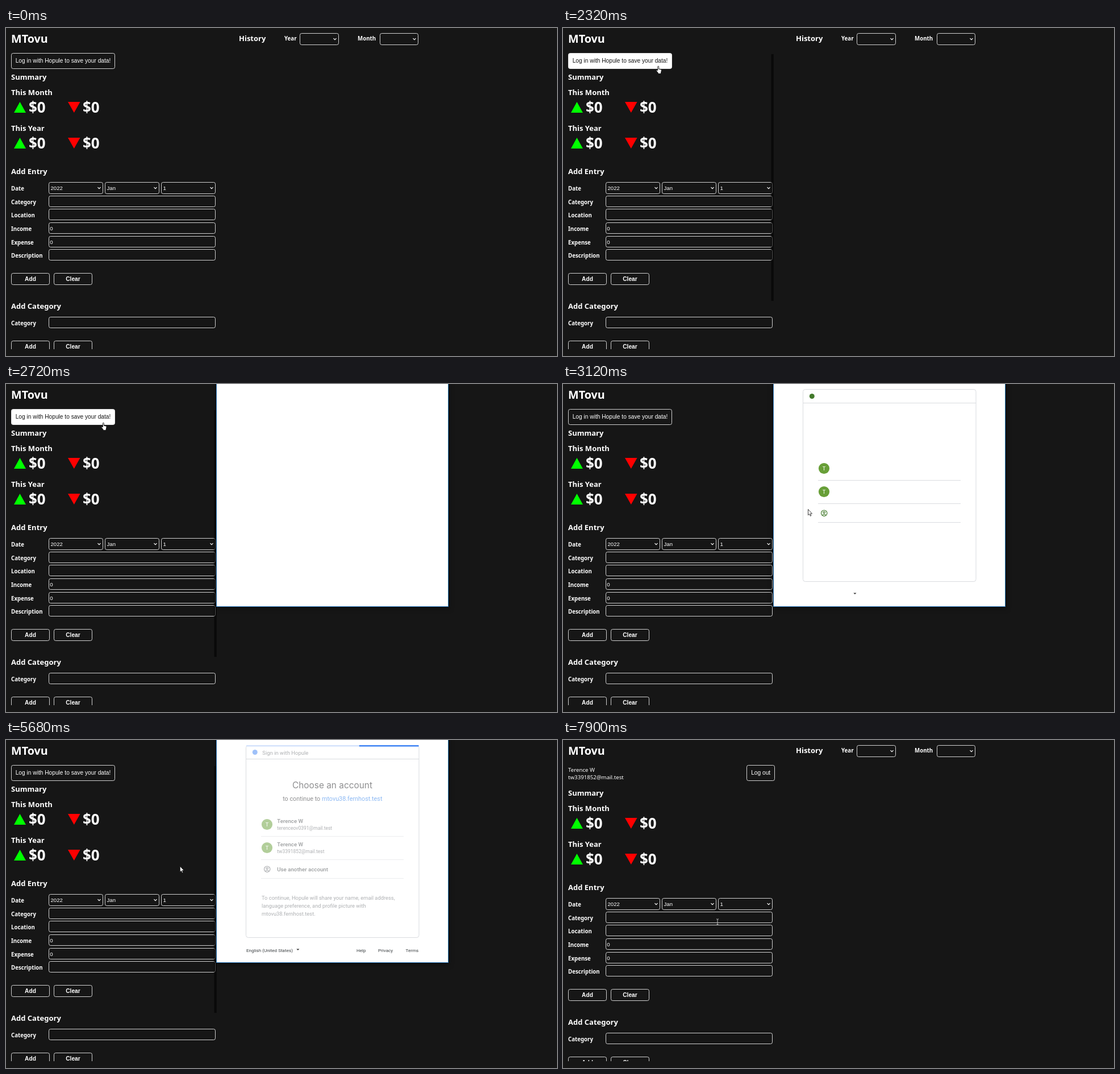
An HTML page for the animation above (8 s loop, 970 by 577 pixels).

```html
<!DOCTYPE html>
<html lang="en">
<head>
<meta charset="utf-8">
<title>Budget tracker login</title>
<style>
html, body { margin: 0; width: 100%; height: 100%; overflow: hidden; background: #161616; }
svg { display: block; width: 970px; height: 577px; }
text { white-space: pre; }
.ui { font-family: "Noto Sans", "Open Sans", sans-serif; }
.form { font-family: "Liberation Sans", Arial, sans-serif; }
.card { font-family: Roboto, sans-serif; }
.title { font-family: Inter, sans-serif; }
.bold { font-weight: 700; }
.medium { font-weight: 500; }
.box { fill: none; stroke: #fff; stroke-width: .8; }
.window { filter: drop-shadow(0 2px 5px rgba(0, 0, 0, .5)); }
</style>
</head>
<body>
<svg id="stage" viewBox="0 0 970 577"></svg>
<script>
const LOOP = 8000;
const APP = 'MTovu', SITE = 'mtovu38.fernhost.test', PROVIDER = 'Hopule';
const USER = 'Terence W', MAILS = ['terenceov0391@mail.test', 'tw3391852@mail.test'];

// Markup helpers
const text = (x, y, size, str, cls = 'ui bold', fill = '#fff', anchor = 'start') =>
  `<text x="${x}" y="${y}" font-size="${size}" class="${cls}" fill="${fill}" text-anchor="${anchor}">${str}</text>`;
const rect = (x, y, w, h, fill, extra = '') =>
  `<rect x="${x}" y="${y}" width="${w}" height="${h}" fill="${fill}" ${extra}/>`;
const box = (x, y, w, h, id = '') =>
  `<rect ${id && `id="${id}"`} class="box" x="${x}" y="${y}" width="${w}" height="${h}" rx="3"/>`;
const path = (d, fill, extra = '') => `<path d="${d}" fill="${fill}" ${extra}/>`;
const line = (x1, x2, y) => path(`M${x1} ${y}H${x2}`, 'none', 'stroke="#dadce0"');
const group = (id, body, extra = '') => `<g id="${id}" ${extra}>${body}</g>`;

const heading = (x, y, str) => text(x, y, 13, str);
const label = (x, y, str) => text(x, y, 9.7, str);
const select = (x, y, w, value = '') => box(x, y, w, 20) +
  text(x + 3, y + 13.5, 9.6, value, 'form') +
  path(`M${x + w - 9} ${y + 8.7}l2.5 2.5 2.5-2.5`, 'none', 'stroke="#fff" stroke-width="1.2"');
const field = (y, name, value = '') => label(9, y + 14, name) + box(75.5, y, 293, 19) +
  text(77.3, y + 13, 9.7, value, 'form');
const button = (x, y, name) => box(x, y, 67, 20) +
  text(x + 33.5, y + 13, 10.2, name, 'form bold', '#fff', 'middle');
const buttons = y => button(9.5, y, 'Add') + button(84.5, y, 'Clear');
const totals = (y, name) => heading(9, y, name) +
  path(`M14 ${y + 31}h21l-10.5-19z`, '#0f0') + text(40, y + 31, 26, '$0') +
  path(`M109 ${y + 12}h21.5l-10.7 19z`, '#f00') + text(135, y + 31, 26, '$0');

const panel = heading(9, 91, 'Summary') +
  totals(118, 'This Month') + totals(181, 'This Year') +
  heading(9, 256.5, 'Add Entry') + label(9, 285.5, 'Date') +
  select(75.5, 271.5, 95, '2022') + select(174.5, 271.5, 95, 'Jan') + select(273.5, 271.5, 95, '1') +
  field(295.5, 'Category') + field(318.5, 'Location') + field(342.5, 'Income', '0') +
  field(366.5, 'Expense', '0') + field(389.5, 'Description') +
  buttons(431.5) + heading(9, 493.5, 'Add Category') + field(508.5, 'Category') + buttons(550.5);

const page = text(9, 26, 19.8, APP) + heading(410, 23.3, 'History') +
  label(490, 22.3, 'Year') + select(517.5, 9.5, 68) +
  label(619, 22.3, 'Month') + select(658.5, 9.5, 67) +
  group('guest', box(9.5, 44.5, 182, 27, 'login') +
    `<text id="loginText" class="form" x="16.7" y="61.3" font-size="10.2">Log in with ${PROVIDER} to save your data!</text>`) +
  group('member', text(9, 55.5, 9.7, USER, 'ui') + text(9, 69, 9.7, MAILS[1], 'ui') +
    box(323.5, 44.5, 49, 27) + text(348.2, 61.3, 10.2, 'Log out', 'form', '#fff', 'middle')) +
  `<g clip-path="url(#panelClip)">${group('panel', panel)}</g>` +
  rect(366.5, 46, 4.3, 434, '#000', 'id="scroll" opacity=".6"');

const avatar = y => `<circle cx="459.5" cy="${y}" r="9.6" fill="#689f38"/>` +
  text(459.5, y + 3.5, 9.5, USER[0], 'card', '#fff', 'middle');
const accountText = (y, mail) => text(477.3, y, 9.7, USER, 'card medium', '#3c4043') +
  text(477.3, y + 12, 8.5, mail, 'card', '#5f6368');

const chooser =
  rect(422.5, 9.5, 304.5, 338, 'none', 'rx="4" stroke="#dadce0"') + line(423, 727, 33.5) +
  rect(423, 170, 303.5, 40, '#f0f5fe', 'id="hover"') +
  group('cardBody',
    '<circle id="mark" cx="438.3" cy="21.5" r="4.5"/>' +
    avatar(148.5) + avatar(189.5) + line(449, 700, 169.5) + line(449, 700, 210.5) + line(449, 700, 243.5) +
    '<g id="person" fill="none" stroke-width="1.2"><circle cx="459.7" cy="227.2" r="5.2"/>' +
    '<circle cx="459.7" cy="225.7" r="1.7"/><path d="M456.2 230.8q3.5-2.9 7 0"/></g>' +
    group('cardText',
      text(451.3, 25.8, 9.5, `Sign in with ${PROVIDER}`, 'card', '#5f6368') +
      text(574.5, 84.5, 15.4, 'Choose an account', 'title', '#202124', 'middle') +
      text(574.8, 107, 10.8, `to continue to <tspan fill="#1a73e8">${SITE}</tspan>`, 'card', '#202124', 'middle') +
      accountText(146.3, MAILS[0]) + accountText(187.3, MAILS[1]) +
      text(477.3, 230.5, 9.7, 'Use another account', 'card medium', '#3c4043') +
      [`To continue, ${PROVIDER} will share your name, email address,`,
        'language preference, and profile picture with', `${SITE}.`]
        .map((row, i) => text(450, 281.3 + i * 13.7, 9.35, row, 'card', '#5f6368')).join(''))) +
  group('footer', text(423, 372.7, 8.1, 'English (United States)', 'card', '#3c4043') +
    text(617, 372.7, 8.1, 'Help', 'card', '#3c4043') + text(655, 372.7, 8.1, 'Privacy', 'card', '#3c4043') +
    text(703.5, 372.7, 8.1, 'Terms', 'card', '#3c4043')) +
  path('M511.3 367.5h5.2l-2.6 2.6z', '#333') +
  group('progress', rect(423, 9, 303.5, 2.5, '#d5e3fc') + rect(423, 9, 0, 2.5, '#4285f4', 'id="bar"'));

const waiting = path('', 'none', 'id="arc" stroke="#4a87ee" stroke-width="8.5"') +
  text(574.3, 107.5, 9.6, 'One moment please...', 'form', '#3b4560', 'middle') +
  rect(371, 380, 407, 11, '#f1f1f1') + rect(382, 381, 362, 9.5, '#c1c1c1') +
  path('M378 383.5v5l-2.7-2.5z', '#a3a3a3') + path('M771.7 383.5v5l2.7-2.5z', '#333');

const popup = `<g class="window">${rect(370.5, -30.5, 408, 422, '#fff', 'stroke="#2f7fc4"')}</g>` +
  group('chooser', chooser) + group('waiting', waiting);

const cursor =
  path('M0 0V10.2L2.3 8.2 3.9 11.8 5.4 11.1 3.9 7.6H7Z', '#fff', 'id="arrow" stroke="#111" stroke-width=".8"') +
  path('M2.4 1.2a1 1 0 0 1 2 0V5.2L8 6a1.4 1.4 0 0 1 1 1.5L8.4 11 7.6 13.5H3.6L2.8 11.7.2 8.4a1 1 0 0 1 1.4-1.2l.8.8Z',
    '#fff', 'id="hand" stroke="#111" stroke-width=".9"') +
  path('M-2 -5.2q2 0 2 1.2v8q0 1.2-2 1.2M2 -5.2q-2 0-2 1.2M0 4q0 1.2 2 1.2', 'none', 'id="beam" stroke="#bbb"');

const stage = document.getElementById('stage');
stage.innerHTML = '<clipPath id="panelClip"><rect width="970" height="565"/></clipPath>' +
  rect(0, 0, 970, 577, '#161616') + group('page', page) + group('popup', popup) + group('cursor', cursor);
const el = {};
stage.querySelectorAll('[id]').forEach(node => { el[node.id] = node; });

// Pointer path: time, x, y
const route = [
  [120, 866, 520], [920, 372, 253], [1420, 205, 155], [1820, 156, 72], [1920, 160, 66], [2520, 166.5, 67.5],
  [2720, 168, 68], [2820, 205, 90], [2920, 295, 145], [3020, 365, 182], [3120, 431.5, 220.5],
  [3520, 455, 218], [3920, 515, 201], [4380, 517, 199.5], [4580, 515, 200], [5080, 345, 214],
  [5380, 306, 222], [6280, 307, 222], [6380, 314, 221], [6980, 317.5, 219.5],
  [7280, 317, 222], [7680, 274, 314], [7880, 272, 320]
];

function pointerAt(t) {
  const i = route.findIndex(key => key[0] > t);
  if (i < 0) return route[route.length - 1].slice(1);
  if (i === 0) return route[0].slice(1);
  const [a, b] = [route[i - 1], route[i]];
  const k = (t - a[0]) / (b[0] - a[0]);
  return [a[1] + (b[1] - a[1]) * k, a[2] + (b[2] - a[2]) * k];
}

const show = (node, on) => node.setAttribute('display', on ? 'inline' : 'none');
const between = (t, from, to) => t >= from && t < to;

function held(t) {
  if (t < 120) return 0;
  const offset = t < 4380 ? 20 : 80;
  return Math.floor((t - offset) / 100) * 100 + offset;
}

function spinnerArc(t) {
  const phase = (((t - 6980) / 1333) % 1 + 1) % 1;
  const ease = k => k * k * (3 - 2 * k);
  const head = 236 * ease(Math.min(1, phase * 2));
  const tail = 236 * ease(Math.max(0, phase * 2 - 1));
  const turn = -62 + 360 * (t - 6980) / 1568;
  const point = deg => {
    const a = (turn + deg) * Math.PI / 180;
    return `${574 + 29.5 * Math.cos(a)} ${48 + 29.5 * Math.sin(a)}`;
  };
  return `M${point(tail)}A29.5 29.5 0 ${head - tail + 34 > 180 ? 1 : 0} 1 ${point(head + 34)}`;
}

function draw(time) {
  const t = held(time);
  const [x, y] = pointerAt(t);
  const member = t >= 7580;

  show(el.page, !between(t, 7480, 7580));
  show(el.guest, !member);
  show(el.member, member);
  el.panel.setAttribute('transform', `translate(0 ${member ? 7 : 0})`);
  const pressed = between(t, 1920, 2820);
  el.login.style.fill = pressed ? '#fff' : 'none';
  el.loginText.setAttribute('fill', pressed ? '#161616' : '#fff');
  show(el.scroll, between(t, 1020, 2920) || between(t, 5080, 6480));

  const fading = between(t, 2520, 2620) || between(t, 7080, 7180);
  show(el.popup, between(t, 2520, 7180));
  el.popup.setAttribute('opacity', fading ? 0.67 : 1);
  el.popup.setAttribute('transform', fading ? 'translate(574.5 180) scale(.983) translate(-574.5 -180)' : '');

  const loaded = t >= 3220;
  show(el.chooser, between(t, 3120, 5780));
  show(el.cardText, loaded);
  show(el.footer, loaded);
  el.mark.setAttribute('fill', loaded ? '#4285f4' : '#437a2c');
  el.person.setAttribute('stroke', loaded ? '#5f6368' : '#437a2c');
  el.cardBody.setAttribute('opacity', t >= 4380 ? 0.5 : 1);
  show(el.hover, loaded && x > 423 && between(y, 170, 243));
  el.hover.setAttribute('y', y < 210.5 ? 170 : 211);
  el.hover.setAttribute('height', y < 210.5 ? 40 : 32);
  show(el.progress, t >= 4480);
  const right = Math.max(0, (t - 4480) * 0.274), left = Math.max(0, right - 130);
  el.bar.setAttribute('x', 423 + left);
  el.bar.setAttribute('width', Math.min(right, 303.5) - left);

  show(el.waiting, between(t, 5980, 7080));
  el.arc.setAttribute('d', spinnerArc(t));

  const beam = t >= 7680;
  show(el.cursor, t >= 120);
  show(el.hand, pressed);
  show(el.beam, beam);
  show(el.arrow, !pressed && !beam);
  el.cursor.setAttribute('transform', `translate(${x} ${y})`);
}

const start = performance.now();
function tick() {
  draw((performance.now() - start) % LOOP);
  requestAnimationFrame(tick);
}
tick();
</script>
</body>
</html>
```
